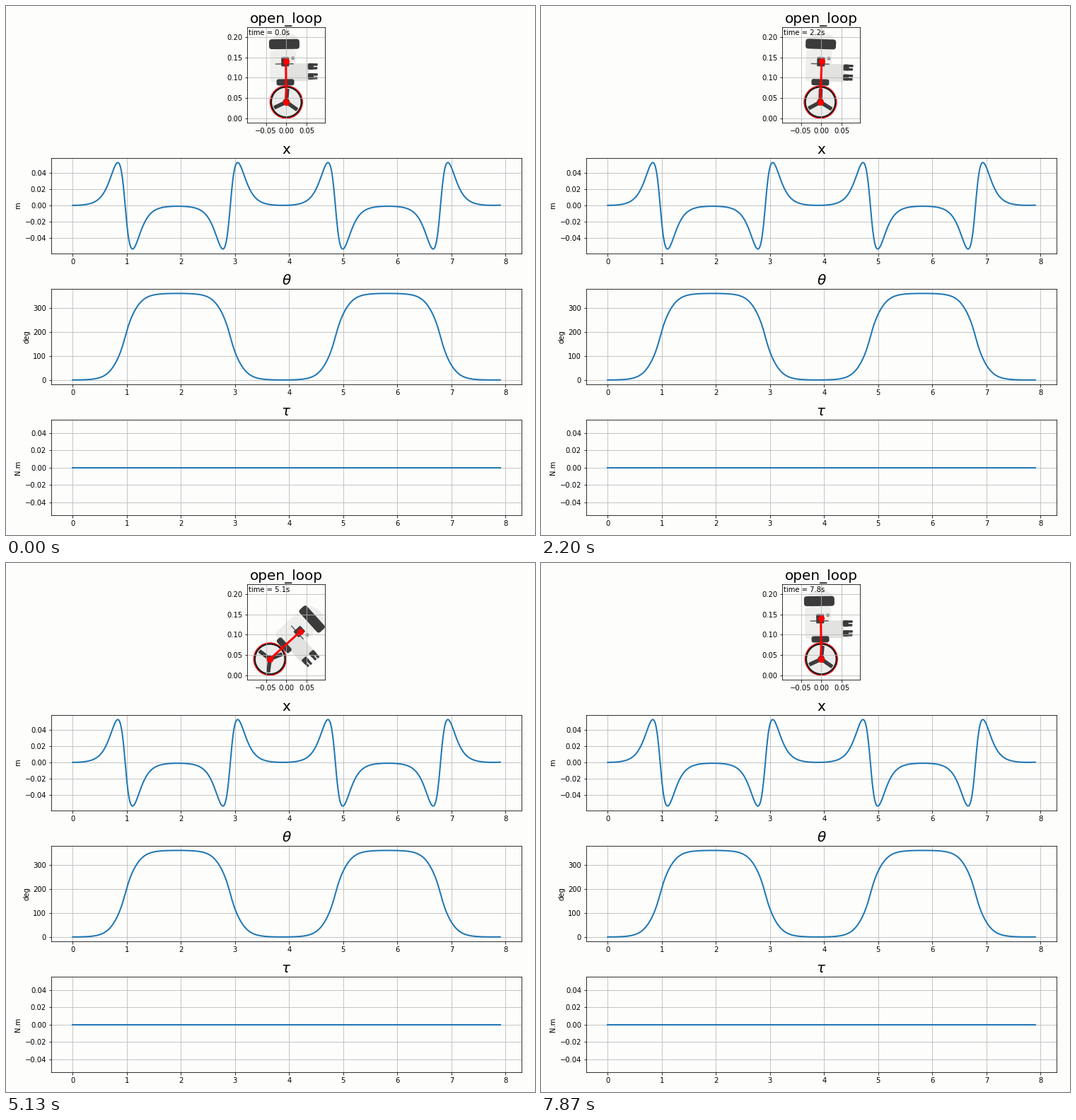
A matplotlib script that plays this animation: 748x748 px, repeating every 7.94 s.

```python
import numpy as np
import matplotlib.pyplot as plt
from matplotlib.animation import FuncAnimation
from matplotlib.patches import Circle, Ellipse, FancyBboxPatch
from matplotlib.transforms import Affine2D

SIZE, DPI = 748, 72
LOOP_MS, FRAMES, FPS = 7940, 119, 15
DT, T_END = 0.05, 7.9

RADIUS, LENGTH = 0.04, 0.1    # wheel radius and pendulum length, m
SWING = 0.0534                # wheel travel per unit of sin(theta)
COUPLING = 0.3                # inertia share taken by the moving wheel
THETA0 = 0.01                 # start angle, rad
HALF = 1.942                  # time for one sweep of the body, s
PX_PER_M = 576

TOP, HEIGHT, PITCH = 30.1, 134.6, 185.1    # rows of axes, px
PAPER = "#fdfdfc"
DARK, SHELL, ARM = "#3b3b3b", "#eeeeec", "#e2e2e1"


def sweep_table(n=20000):
    """Times and angles of one sweep, from conservation of energy."""
    s = (np.arange(n) + 0.5) / n * np.pi - np.pi / 2
    theta = np.pi + (np.pi - THETA0) * np.sin(s)
    inertia = 1 - COUPLING * np.cos(theta) ** 2
    step = np.sqrt(inertia / (np.cos(THETA0) - np.cos(theta))) * np.cos(s)
    t = np.cumsum(step) - step / 2
    return t / step.sum() * HALF, theta


SWEEP_T, SWEEP_THETA = sweep_table()


def angle(t):
    u = HALF - np.abs(np.mod(t, 2 * HALF) - HALF)
    return np.interp(u, SWEEP_T, SWEEP_THETA)


def travel(theta):
    return SWING * (np.sin(theta) - np.sin(THETA0))


plt.rcParams.update({"font.family": "DejaVu Sans", "font.size": 10})
fig = plt.figure(figsize=(SIZE / DPI, SIZE / DPI), dpi=DPI, facecolor=PAPER)


def add_axes(row, title, left=64, right=729):
    bottom = TOP + row * PITCH + HEIGHT
    ax = fig.add_axes([left / SIZE, 1 - bottom / SIZE,
                       (right - left) / SIZE, HEIGHT / SIZE])
    ax.set_facecolor(PAPER)
    ax.set_title(title, fontsize=20)
    ax.grid(True, color="#b8b8b8", linewidth=0.8)
    return ax


times = np.linspace(0, T_END, 791)
thetas = angle(times)
plots = [("x", "m", travel(thetas)),
         (r"$\theta$", "deg", np.degrees(thetas)),
         (r"$\tau$", "N.m", 0 * times)]
for row, (title, unit, values) in enumerate(plots, 1):
    ax = add_axes(row, title)
    ax.plot(times, values, color="#1f77b4", linewidth=2)
    ax.set_ylabel(unit)

view = add_axes(0, "open_loop", 341.2, 451.4)
view.set_xlim(-0.0957, 0.0957)
view.set_ylim(-0.0101, 0.2237)
view.set_xticks(np.arange(-1, 2) * 0.05)
view.set_yticks(np.arange(5) * 0.05)

body, wheel = Affine2D(), Affine2D()


def attach(patch, frame, zorder):
    patch.set_zorder(zorder)
    view.add_patch(patch)
    patch.set_transform(frame + view.transData)


def slab(x, y, w, h, color, corner=1):
    """Rounded block around a centre, in pixels from the wheel hub."""
    return FancyBboxPatch((x - w / 2 + corner, y - h / 2 + corner),
                          w - 2 * corner, h - 2 * corner,
                          boxstyle=f"round,pad={corner}",
                          facecolor=color, edgecolor="none")


robot = [
    Ellipse((-1, 84), 40, 28, facecolor=SHELL),
    slab(-4, 51, 37, 44, SHELL, 4),
    slab(16, 42, 34, 25, ARM, 2),
    slab(-2, 54, 26, 1.5, "#5a5a5a", 0.5),
    slab(-2, 82, 43, 14, DARK, 4),
    slab(-1, 57, 11, 13, DARK),
    slab(-1, 28, 25, 9, DARK, 3),
    Circle((10, 62), 2.5, facecolor="#8f8f8f"),
]
for y in (50, 36):
    robot += [slab(35, y, 8, 9, DARK, 2),
              slab(40, y + 2.5, 10, 3.5, DARK), slab(40, y - 2.5, 9, 3.5, DARK)]
for i, part in enumerate(robot):
    attach(part, body, 0.1 + 0.02 * i)

attach(Circle((0, 0), 21.5, facecolor="#ebebea", edgecolor="#1c1c1c",
              linewidth=2.5), wheel, 0.5)
for deg in (85, 205, 325):
    attach(slab(10, 0, 18, 5.5, DARK), Affine2D().rotate_deg(deg) + wheel, 0.6)
attach(Circle((0, 0), 5, facecolor=DARK), wheel, 0.7)

rim = Circle((0, RADIUS), RADIUS, fill=False, edgecolor="red", linewidth=1.2)
view.add_patch(rim)
rod, = view.plot([], [], color="red", linewidth=3, marker="o", markersize=8)
clock = view.text(0.02, 0.918, "", transform=view.transAxes)


def place(frame, turn, x):
    frame.clear().scale(1 / PX_PER_M).rotate(turn).translate(x, RADIUS)


def update(k):
    # Show the state at the end of the frame's slot, on the simulation's steps
    tick = min(k + 1, FRAMES - 1)
    t = tick / FPS // DT * DT
    theta = angle(t)
    x = travel(theta)
    place(body, theta, x)
    place(wheel, -x / RADIUS, x)
    rim.center = (x, RADIUS)
    rod.set_data([x, x - LENGTH * np.sin(theta)],
                 [RADIUS, RADIUS + LENGTH * np.cos(theta)])
    clock.set_text(f"time = {np.round(t, 1):.1f}s")
    return rim, rod, clock


anim = FuncAnimation(fig, update, frames=FRAMES, interval=LOOP_MS / FRAMES,
                     repeat=True, repeat_delay=0, cache_frame_data=False)
plt.show()
```
